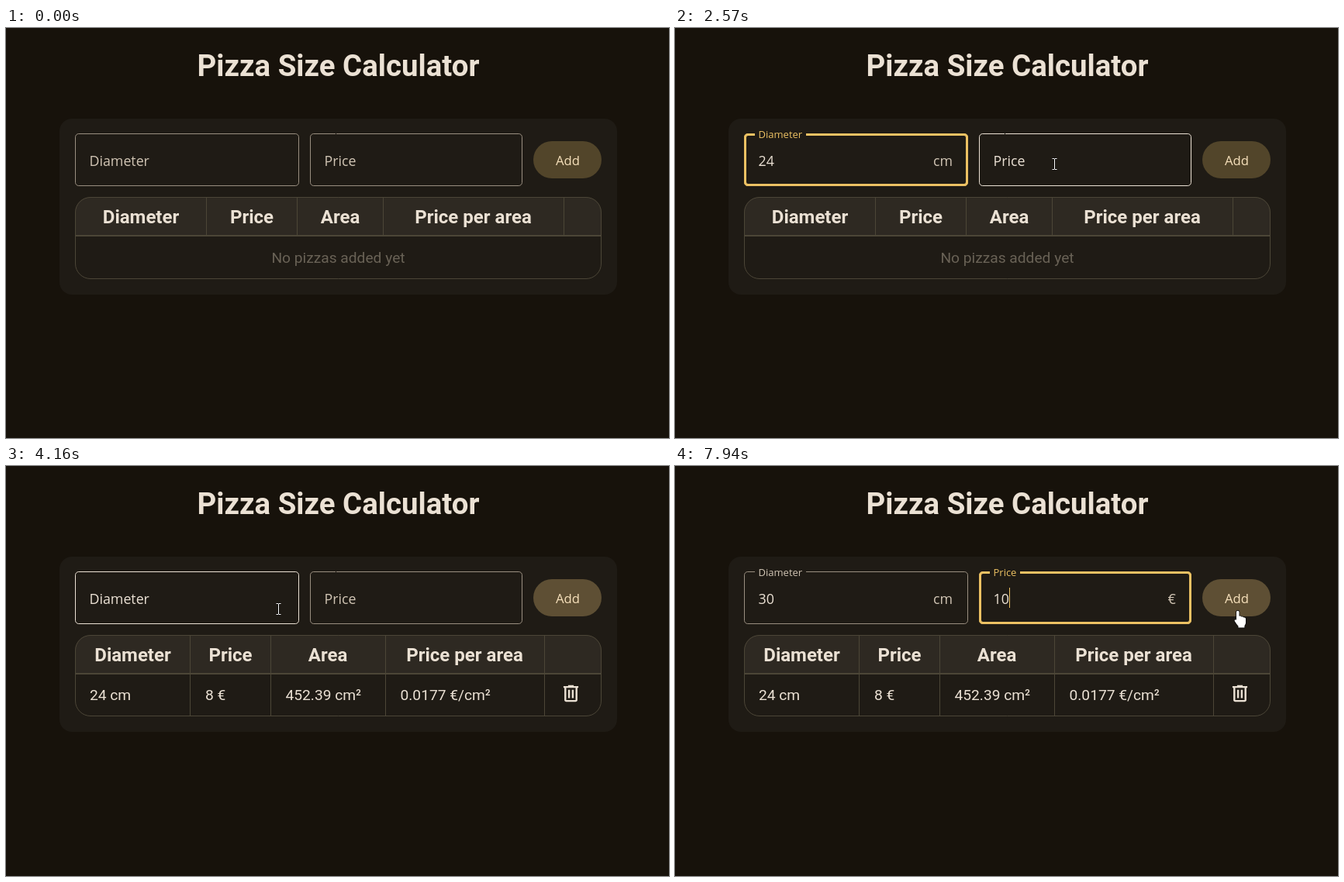
An HTML page with a canvas for the animation above (8000 ms loop, 855x529 px).

```html
<!DOCTYPE html>
<html lang="en">
<head>
<meta charset="utf-8">
<title>Pizza Size Calculator</title>
<style>
  html, body { margin: 0; width: 100%; height: 100%; overflow: hidden; background: #17120b; }
  canvas { display: block; }
</style>
</head>
<body>
<canvas id="stage" width="855" height="529"></canvas>
<script>
const ctx = document.getElementById('stage').getContext('2d', { alpha: false });
const LOOP = 8000;
const C = {
  bg: '#17120b', card: '#1f1b15', head: '#2e2922', line: '#4c4637',
  text: '#ebe1d4', soft: '#d1c5b4', faint: '#696256', outline: '#9a8f80',
  gold: '#ecc163', button: '#52452a', onButton: '#f6e0bb'
};
const UI = '"Open Sans", "Noto Sans", sans-serif';
const ROBOTO = 'Roboto, Arial, sans-serif';

// Alternating on/off moments
const times = {
  dFloat: [1140, 3750, 4450],
  pFloat: [2630, 3750, 6216],
  dFocus: [1140, 2630, 4450, 6216],
  pFocus: [2630, 3690, 6216],
  dCaret: [1140, 1640, 1890, 2150, 4450, 4950, 5190, 5430, 5940, 6216],
  pCaret: [2630, 3130, 3310, 3630, 6216, 6760, 6820, 7260, 7760],
  cursor: [660, 1890, 2150, 3310, 3370, 5190, 5940, 6820, 7700],
  click: [1130, 1255, 2625, 2755, 3680, 3810, 4445, 4570, 6200, 6370],
  press: [3690, 3870],
  addFocus: [3690, 4450]
};
const typed = {
  d: [[0, ''], [1890, '2'], [2150, '24'], [3750, ''], [5190, '3'], [5370, '30']],
  p: [[0, ''], [3310, '8'], [3750, ''], [6820, '1'], [7010, '10']]
};
// time, x, y
const route = [
  [660, 699, 512], [1100, 256, 173], [2150, 256, 173], [2560, 489, 175],
  [3340, 489, 175], [3560, 715.5, 182], [3840, 715.5, 182], [4165, 351, 184],
  [4400, 250, 175], [5930, 250, 175], [6190, 480, 175.5], [7690, 480, 175.5],
  [7880, 716, 189], [7940, 730.5, 185]
];
const beam = new Path2D('M-3 -6.5h2.5l.5.5.5-.5H3M0 -6V7M-3 7.5h2.5L0 7l.5.5H3');
const arrow = new Path2D('M.5.5v16l3.8-3.6 2.5 5.6 2.4-1-2.5-5.5h5.2z');
const hand = new Path2D('M5.5 1.5c1 0 1.8.7 1.8 1.8v5.2c.4-.4 2.8-.4 3 .9.7-.6 2.6-.4 2.9.9.8-.5 2.6-.1 2.6 1.6v5c0 1.8-1.3 3-1.6 4.2v2.2h-8v-2c-1.5-1.5-3.2-4.3-4.6-6.4-.9-1.4.6-2.7 1.9-1.6l.2.2v-10.2c0-1.1.8-1.8 1.8-1.8z');
const bin = new Path2D('M7 21q-.825 0-1.412-.587Q5 19.825 5 19V6H4V4h5V3h6v1h5v2h-1v13q0 .825-.587 1.413Q17.825 21 17 21ZM17 6H7v13h10ZM9 17h2V8H9Zm4 0h2V8h-2Z');

const count = (list, t) => list.filter(v => v <= t).length;
const isOn = (list, t) => count(list, t) % 2 === 1;
const lerp = (a, b, p) => a + (b - a) * p;
const latest = (list, t) => list.filter(e => e[0] <= t).pop()[1];

// cubic-bezier(.2, 0, 0, 1)
function ease(x) {
  if (x >= 1) return 1;
  let lo = 0, hi = 1;
  for (let i = 0; i < 20; i++) {
    const m = (lo + hi) / 2;
    if (0.6 * (1 - m) ** 2 * m + m ** 3 < x) lo = m; else hi = m;
  }
  return lo * lo * (3 - 2 * lo);
}

function ramp(list, t) {
  const n = count(list, t);
  if (!n) return 0;
  const p = ease((t - list[n - 1]) / 150);
  return n % 2 ? p : 1 - p;
}

function cursorAt(t) {
  const i = route.findIndex(r => r[0] > t);
  if (i === 0) return route[0].slice(1);
  if (i < 0) return route[route.length - 1].slice(1);
  const [a, b] = [route[i - 1], route[i]];
  const u = (t - a[0]) / (b[0] - a[0]);
  const p = u * u * (3 - 2 * u);
  return [lerp(a[1], b[1], p), lerp(a[2], b[2], p)];
}

function text(str, x, y, font, color, align = 'left') {
  ctx.font = font;
  ctx.fillStyle = color;
  ctx.textAlign = align;
  ctx.fillText(str, x, y);
}

function rect(x, y, w, h, color) {
  ctx.fillStyle = color;
  ctx.fillRect(x, y, w, h);
}

function round(x, y, w, h, r) {
  ctx.beginPath();
  ctx.roundRect(x, y, w, h, r);
}

function outline(f, half, width, color, alpha) {
  const i = width / 2, r = 4.5 - i / 2;
  const l = f.x + i, t = 136 + i, R = f.x + f.w - i, b = 204 - i;
  ctx.globalAlpha = alpha;
  ctx.strokeStyle = color;
  ctx.lineWidth = width;
  ctx.beginPath();
  ctx.moveTo(f.mid + half, t);
  ctx.arcTo(R, t, R, b, r);
  ctx.arcTo(R, b, l, b, r);
  ctx.arcTo(l, b, l, t, r);
  ctx.arcTo(l, t, R, t, r);
  ctx.lineTo(f.mid - half, t);
  ctx.stroke();
  ctx.globalAlpha = 1;
}

function field(f) {
  const half = Math.max(f.gap, f.notch * f.float);
  const idle = f.hover ? C.text : C.outline;
  outline(f, half, 1, f.focused ? C.gold : idle, 1);
  if (f.focus > 0.01) outline(f, half, 3, f.focused ? C.gold : C.outline, f.focus);

  const left = f.x + 19;
  const color = f.focused ? C.gold : f.hover ? C.text : C.soft;
  text(f.label, left - 0.5, lerp(178, 142, f.float), `${lerp(17.8, 13, f.float)}px ${UI}`, color);
  ctx.globalAlpha = f.float;
  text(f.unit, f.x + f.w - 20, 178, `17.8px ${UI}`, C.soft, 'right');
  ctx.globalAlpha = 1;
  text(f.value, left - 0.5, 178, `17.8px ${UI}`, C.text);
  if (f.caret) rect(left + 10 * f.value.length, 157, 1, 26, f.caretColor);
}

function table(filled) {
  const bottom = filled ? 323 : 324;
  const cols = filled ? [237, 341, 489, 694] : [258, 375, 486, 719];
  const mids = filled ? [163.5, 289.5, 415, 591.5] : [174, 317, 431, 602.5];
  ctx.save();
  round(89, 218, 679, bottom - 218, 20);
  ctx.clip();
  rect(89, 218, 679, 50, C.head);
  rect(89, 267, 679, 2, C.line);
  cols.forEach(x => rect(x, 218, 1, filled ? 105 : 50, C.line));
  ctx.restore();
  round(89.5, 218.5, 678, bottom - 219, 19.5);
  ctx.strokeStyle = C.line;
  ctx.lineWidth = 1;
  ctx.stroke();
  ['Diameter', 'Price', 'Area', 'Price per area'].forEach((s, i) =>
    text(s, mids[i], 252, `bold 24px ${ROBOTO}`, C.text, 'center'));

  const font = `19.2px ${ROBOTO}`;
  if (!filled) {
    text('No pizzas added yet', 428.5, 303, font, C.faint, 'center');
    return;
  }
  ['24 cm', '8 €', '452.39 cm²', '0.0177 €/cm²'].forEach((s, i) =>
    text(s, [108, 257, 360.5, 508.5][i], 302, font, C.text));
  ctx.save();
  ctx.translate(714.1, 279.1);
  ctx.scale(1.2, 1.2);
  ctx.fillStyle = C.text;
  ctx.fill(bin, 'evenodd');
  ctx.restore();
}

function addButton(hover, focus, press) {
  round(680, 146, 88, 48, 24);
  ctx.fillStyle = C.button;
  ctx.fill();
  ctx.globalAlpha = Math.min(0.16, (hover || focus ? 0.065 : 0) + (press ? 0.08 : 0));
  ctx.fillStyle = C.onButton;
  ctx.fill();
  ctx.globalAlpha = 1;
  text('Add', 724.5, 177, `16.7px ${UI}`, C.onButton, 'center');
}

function drawCursor(x, y, kind, click) {
  if (click) {
    ctx.fillStyle = 'rgba(255,255,0,.45)';
    ctx.beginPath();
    ctx.arc(x - 1, y - 0.5, 12, 0, 7);
    ctx.fill();
  }
  ctx.save();
  if (kind === 'beam') {
    ctx.translate(Math.round(x) + 0.5, Math.round(y));
    ctx.strokeStyle = 'rgba(0,0,0,.6)';
    ctx.lineWidth = 2.4;
    ctx.stroke(beam);
    ctx.strokeStyle = '#fff';
    ctx.lineWidth = 1;
    ctx.stroke(beam);
  } else {
    const shape = kind === 'hand' ? hand : arrow;
    if (kind === 'hand') ctx.translate(x - 5.5, y - 1);
    else ctx.translate(x, y);
    ctx.lineWidth = 1.4;
    ctx.strokeStyle = '#000';
    ctx.stroke(shape);
    ctx.fillStyle = '#fff';
    ctx.fill(shape);
  }
  ctx.restore();
}

function draw(t) {
  const s = t < 660 ? t : 660 + 61.5 * Math.floor((t - 660) / 61.5 + 0.45);
  const [x, y] = cursorAt(s);
  const inside = (l, top, r, b) => x >= l && x < r && y >= top && y < b;
  const overD = inside(89, 136, 378, 204);
  const overP = inside(392, 136, 666, 204);
  const overAdd = inside(680, 146, 768, 194);
  const filled = s >= 3750;

  rect(0, 0, 855, 529, C.bg);
  text('Pizza Size Calculator', 428.5, 62, `bold 38.4px ${ROBOTO}`, C.text, 'center');
  round(69, 117, 719, filled ? 226 : 227, 16);
  ctx.fillStyle = C.card;
  ctx.fill();

  field({
    x: 89, w: 289, mid: 136, notch: 33, gap: 0, label: 'Diameter', unit: 'cm',
    float: ramp(times.dFloat, s), focus: ramp(times.dFocus, s),
    focused: isOn(times.dFocus, s), caret: isOn(times.dCaret, t),
    caretColor: C.gold, value: latest(typed.d, t), hover: overD
  });
  field({
    x: 392, w: 274, mid: 425.5, notch: 19.5, gap: 0.5, label: 'Price', unit: '€',
    float: ramp(times.pFloat, s), focus: ramp(times.pFocus, s),
    focused: isOn(times.pFocus, s), caret: isOn(times.pCaret, t),
    caretColor: t > 3310 && t < 3690 ? C.soft : C.gold, value: latest(typed.p, t), hover: overP
  });
  addButton(overAdd, isOn(times.addFocus, s), isOn(times.press, s));
  table(filled);

  if (isOn(times.cursor, t)) {
    const overNote = !filled && inside(343, 286, 515, 308);
    const kind = overAdd ? 'hand' : overD || overP || overNote ? 'beam' : 'arrow';
    drawCursor(x, y, kind, isOn(times.click, s));
  }
}

const start = performance.now();
function tick() {
  draw((performance.now() - start) % LOOP);
  requestAnimationFrame(tick);
}
tick();
</script>
</body>
</html>
```
